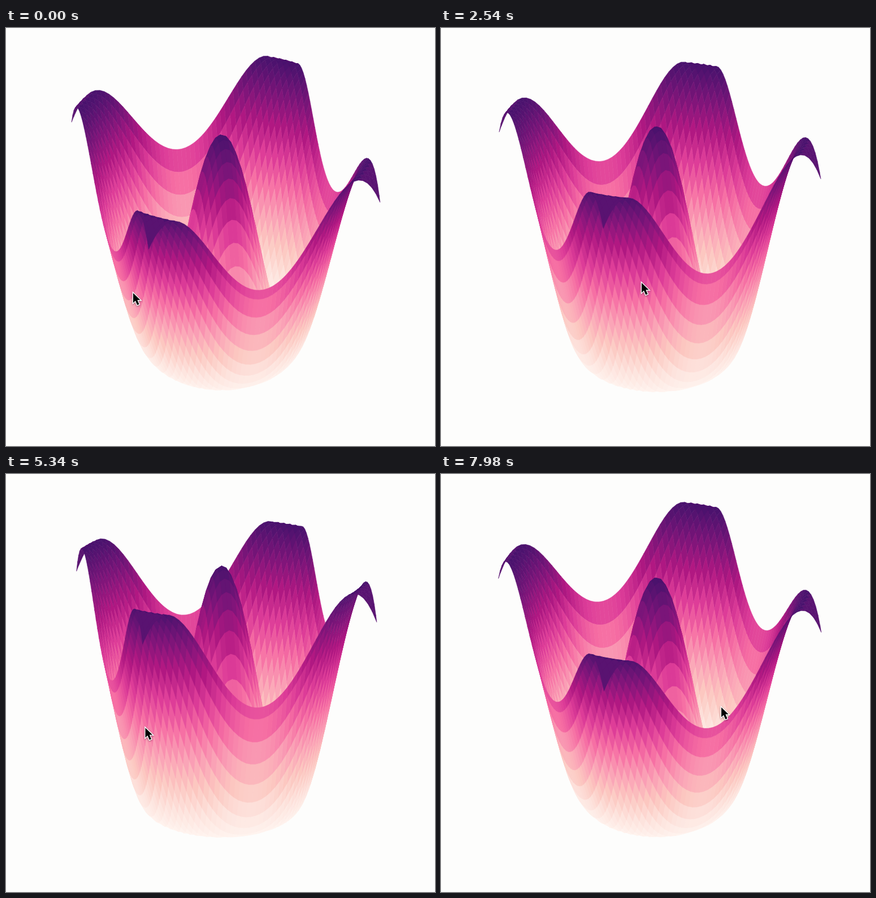
Write an HTML page with a canvas that moves like this. It is 759 by 738 pixels and loops after 8000 ms.

```html
<!DOCTYPE html>
<html lang="en">
<head>
<meta charset="utf-8">
<title>Rotating surface</title>
<style>
  html, body { margin: 0; width: 100%; height: 100%; overflow: hidden; background: #fdfdfc; }
  canvas { display: block; width: 759px; height: 738px; }
</style>
</head>
<body>
<canvas id="stage" width="759" height="738"></canvas>
<script>
const ctx = document.getElementById('stage').getContext('2d');
const LOOP = 8000;
const CENTER = { x: 381.5, y: 378 };
const UNIT = 41.8;      // px per unit of the base plane
const AMP = 228;        // px per unit of height
const CAMERA = 4400;    // viewing distance, px
const STEP = 0.2;       // patch size

const POSES = [
  { t: 0, yaw: 20.6, pitch: 36.7, x: 224, y: 466 },
  { t: 1660, yaw: 12.8, pitch: 34.2, x: 62, y: 441 },
  { t: 2540, yaw: 27.5, pitch: 29.5, x: 354, y: 448 },
  { t: 3800, yaw: 27.7, pitch: 32.8, x: 454, y: 422 },
  { t: 4600, yaw: 8, pitch: 24.7, x: 363, y: 425 },
  { t: 6140, yaw: 30, pitch: 18.7, x: 114, y: 470 },
  { t: 7980, yaw: 27.7, pitch: 34.2, x: 495, y: 410 }
];

const RAMP = ['#fff5f0', '#fde3dd', '#fcc7c0', '#fa9fb5', '#f66ea3',
  '#dd3c98', '#b01882', '#7c1579', '#49126d']
  .map(c => [1, 3, 5].map(i => parseInt(c.slice(i, i + 2), 16)));

function color(t) {
  const p = t * (RAMP.length - 1);
  const i = Math.min(Math.floor(p), RAMP.length - 2);
  return `rgb(${RAMP[i].map((v, k) => Math.round(v + (RAMP[i + 1][k] - v) * (p - i)))})`;
}

// The function is sampled on [-5, 4.9], so the last patch is half as wide
const lines = [];
for (let i = -25; i <= 24; i++) lines.push(i * STEP);
lines.push(4.9);
const N = lines.length;

const points = [];
for (const q of lines) for (const p of lines) {
  points.push({ p: -p * UNIT, q: q * UNIT, h: AMP * Math.cos(Math.hypot(p, q)), x: 0, y: 0 });
}

const cells = [];
for (let j = 0; j < N - 1; j++) for (let i = 0; i < N - 1; i++) {
  const p = (lines[i] + lines[i + 1]) / 2, q = (lines[j] + lines[j + 1]) / 2;
  const r = Math.hypot(p, q), k = j * N + i;
  cells.push({
    p: -p, q, near: 0,
    fill: color(r > 2 * Math.PI ? 0.96 : (Math.cos(r) + 1) / 2),
    corners: [k, k + 1, k + N + 1, k + N].map(n => points[n])
  });
}

function poseAt(t) {
  let i = 0;
  while (i < POSES.length - 2 && t >= POSES[i + 1].t) i++;
  const a = POSES[i], b = POSES[i + 1];
  const u = Math.min((t - a.t) / (b.t - a.t), 1);
  const e = u * u * (3 - 2 * u);
  const mix = key => a[key] + (b[key] - a[key]) * e;
  return { yaw: mix('yaw'), pitch: mix('pitch'), x: mix('x'), y: mix('y') };
}

function drawSurface(yaw, pitch) {
  const cy = Math.cos(yaw), sy = Math.sin(yaw);
  const cp = Math.cos(pitch), sp = Math.sin(pitch);
  const nearness = o => o.q * cy - o.p * sy;
  for (const o of points) {
    const near = nearness(o);
    const m = 1 / (1 - (o.h * sp + near * cp) / CAMERA);
    o.x = CENTER.x + (o.p * cy + o.q * sy) * m;
    o.y = CENTER.y - (o.h * cp - near * sp) * m;
  }
  for (const c of cells) c.near = nearness(c);
  cells.sort((a, b) => a.near - b.near);
  ctx.lineWidth = 0.6;
  ctx.lineJoin = 'round';
  for (const c of cells) {
    ctx.beginPath();
    for (const o of c.corners) ctx.lineTo(o.x, o.y);
    ctx.closePath();
    ctx.fillStyle = ctx.strokeStyle = c.fill;
    ctx.fill();
    ctx.stroke();
  }
}

const ARROW = new Path2D('M0 0V19.5L4.5 15.3L8.2 24L12 22.4L8.3 14H14.3Z');

function drawPointer(x, y) {
  ctx.save();
  ctx.translate(x + 1, y + 2);
  ctx.scale(0.88, 0.88);
  ctx.lineWidth = 3;
  ctx.lineJoin = 'miter';
  ctx.strokeStyle = '#fff';
  ctx.shadowColor = 'rgba(0,0,0,.4)';
  ctx.shadowBlur = 3;
  ctx.shadowOffsetY = 1;
  ctx.stroke(ARROW);
  ctx.shadowColor = 'transparent';
  ctx.fillStyle = '#000';
  ctx.fill(ARROW);
  ctx.restore();
}

function render(t) {
  const rad = Math.PI / 180;
  const pose = poseAt(t);
  ctx.fillStyle = '#fdfdfc';
  ctx.fillRect(0, 0, 759, 738);
  drawSurface(pose.yaw * rad, pose.pitch * rad);
  drawPointer(pose.x, pose.y);
}

const start = performance.now();
function tick() {
  render((performance.now() - start) % LOOP);
  requestAnimationFrame(tick);
}
tick();
</script>
</body>
</html>
```
